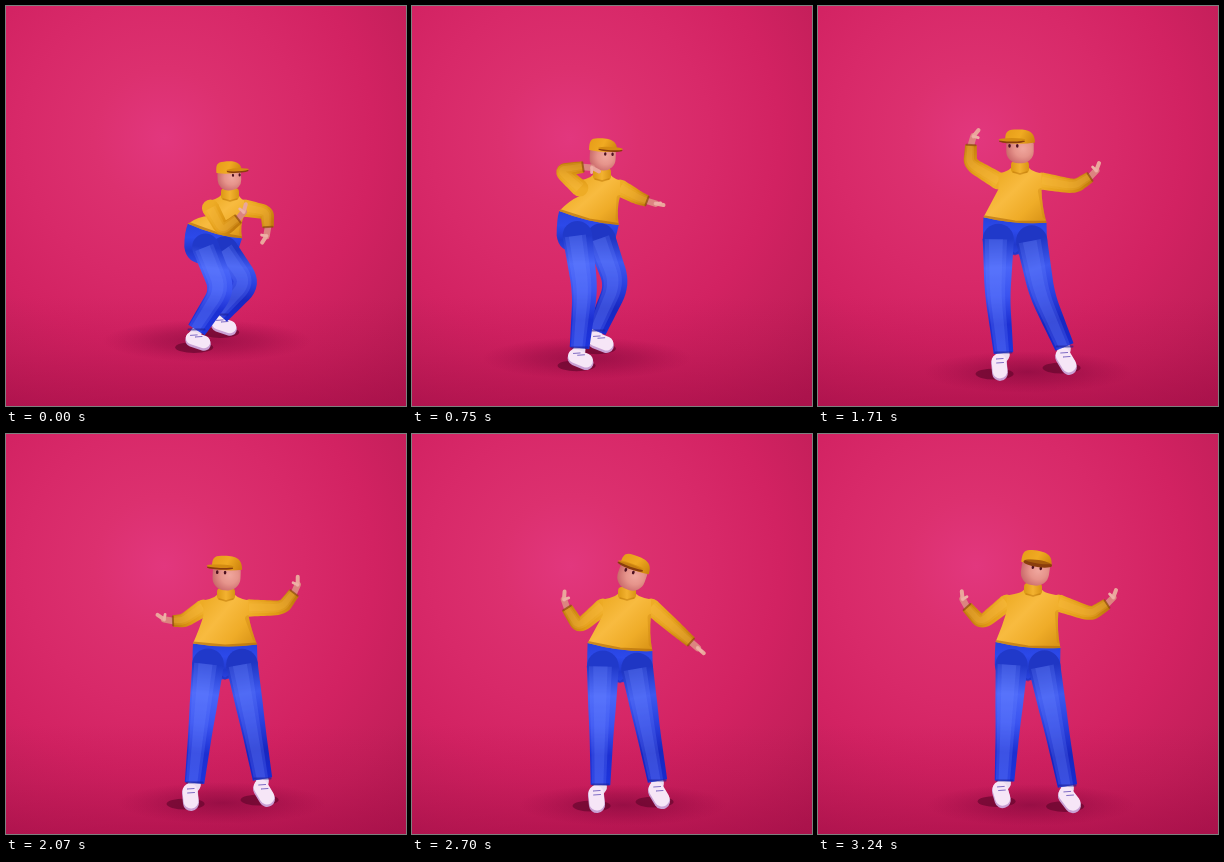
Animation of 400 by 400 pixels, one loop 3.27 s. Source, as an HTML page with a canvas:

```html
<!DOCTYPE html>
<html lang="en">
<head>
<meta charset="utf-8">
<title>Dancer</title>
<style>
html, body { margin: 0; width: 100%; height: 100%; overflow: hidden; background: #d2265f; }
canvas { display: block; width: 400px; height: 400px; }
</style>
</head>
<body>
<canvas id="stage" width="400" height="400"></canvas>
<script>
const ctx = document.getElementById('stage').getContext('2d');
const LOOP = 3270, STEP = 30, ARM = 54, LEG = 115;

// The dance: time, facing (-1 left to 1 right), head tilt, then the points
// neck, waist, left wrist, right wrist, left heel, right heel.
// Shoulders, elbows, hips, knees, hands and shoes all follow from these.
const poses = [
  [0, .9, -.05, 224, 185, 209, 225, 232, 213, 262, 221, 186, 332, 212, 317],
  [750, .7, .05, 190, 165, 177, 212, 171, 161, 235, 195, 163, 350, 183, 333],
  [1290, -.1, 0, 188, 161, 183, 215, 139, 169, 261, 170, 180, 352, 197, 343],
  [1710, -.72, 0, 202, 158, 197, 214, 153, 139, 272, 171, 181, 355, 245, 349],
  [2070, -.6, .04, 220, 157, 219, 210, 167, 187, 288, 159, 184, 357, 255, 353],
  [2700, -.4, .34, 215, 156, 208, 213, 155, 174, 279, 208, 184, 359, 244, 355],
  [3240, .12, .15, 215, 152, 210, 211, 149, 173, 289, 170, 182, 355, 248, 360]
];

const clamp = (v, lo = 0, hi = 1) => Math.max(lo, Math.min(hi, v));
const add = (p, x, y) => [p[0] + x, p[1] + y];
const mix = (a, b, u) => [a[0] + (b[0] - a[0]) * u, a[1] + (b[1] - a[1]) * u];

// Smooth interpolation with slopes taken from neighbouring poses.
function poseAt(t) {
  const last = poses.length - 1;
  let i = 0;
  while (i < last - 1 && t >= poses[i + 1][0]) i++;
  const from = poses[i], to = poses[i + 1], span = to[0] - from[0], u = (t - from[0]) / span;
  return from.map((v, k) => {
    const slope = j => {
      const a = poses[Math.max(0, j - 1)], b = poses[Math.min(last, j + 1)];
      return (b[k] - a[k]) / (b[0] - a[0]);
    };
    return v + (to[k] - v) * u * u * (3 - 2 * u)
      + span * .8 * u * (1 - u) * (slope(i) * (1 - u) - slope(i + 1) * u);
  });
}

// Middle joint of a two-bone limb; bend sets how far and to which side it leaves the line.
function joint(a, b, reach, along, bend) {
  const dx = b[0] - a[0], dy = b[1] - a[1], d = Math.hypot(dx, dy) || 1;
  const h = Math.sqrt(Math.max(0, reach * reach - d * d)) / 2 * bend(dx / d, dy / d);
  return add(mix(a, b, along), -dy / d * h, dx / d * h);
}

function buildRig(t) {
  const [, yaw, tilt, ...xy] = poseAt(t);
  const lift = t < 750 ? 13 * Math.sin(Math.PI * t / 750) : 0;
  const [neck, waist, wristL, wristR, heelL, heelR] = [0, 2, 4, 6, 8, 10].map(k =>
    [xy[k], xy[k + 1] - lift * clamp((320 - xy[k + 1]) / 150)]);
  const size = .82 + clamp((heelL[1] + heelR[1]) / 2 - 325, 0, 36) / 200;
  const side = Math.max(0, yaw), slope = (neck[0] - waist[0]) * .018;
  const half = 33 * size, hipHalf = half * (.53 - .2 * side);

  const arm = (sign, wrist) => {
    const shoulder = add(neck, sign * (27 * size - 6 * Math.abs(yaw)) - 3 * side, 17);
    const elbow = joint(shoulder, wrist, ARM * size, .68,
      (x, y) => clamp(3 * (x * .5 - y * sign), -1, 1));
    return [shoulder, elbow, wrist];
  };
  const leg = (sign, heel) => {
    const hip = add(waist, sign * hipHalf, 21 * size + sign * hipHalf * slope * .5);
    const ankle = add(heel, 3 - sign * 1.5, -8);
    const knee = joint(hip, ankle, LEG, .49, () => -.55 * clamp(2 * yaw + .7, -1, 1));
    const turn = clamp(yaw * 1.3), out = sign > 0 ? 6 : 1;
    const toe = add(heel, 12 * turn + out * (1 - turn), 10 - 6 * turn);
    return { bones: [hip, knee, ankle], heel, toe };
  };
  return {
    yaw, tilt, neck, waist, size, side,
    head: add(neck, 14.5 * size * Math.sin(tilt), -14.8 * size * Math.cos(tilt)),
    hem: [-1, 1].map(s => add(waist, s * half, s * half * slope)),
    armL: arm(-1, wristL), armR: arm(1, wristR),
    legL: leg(-1, heelL), legR: leg(1, heelR)
  };
}

function fill(color, alpha = 1) {
  ctx.globalAlpha = alpha;
  ctx.fillStyle = color;
  ctx.fill();
  ctx.globalAlpha = 1;
}
function oval(x, y, rx, ry, color, alpha) {
  ctx.beginPath();
  ctx.ellipse(x, y, rx, ry, 0, 0, 7);
  fill(color, alpha);
}
function shape(pts) {
  ctx.beginPath();
  pts.forEach(p => ctx.lineTo(...p));
  ctx.closePath();
}
function line(pts, width, color, alpha = 1) {
  ctx.globalAlpha = alpha;
  ctx.beginPath();
  pts.forEach(p => ctx.lineTo(...p));
  ctx.lineWidth = width;
  ctx.strokeStyle = color;
  ctx.stroke();
  ctx.globalAlpha = 1;
}
function paint(g, colors) {
  colors.forEach((c, i) => g.addColorStop(i / (colors.length - 1), c));
  return g;
}
const ramp = (a, b, ...colors) => paint(ctx.createLinearGradient(...a, ...b), colors);
const glow = (x, y, r, ...colors) => paint(ctx.createRadialGradient(x, y, 0, x, y, r), colors);

// Tapered tube along two bones with a rounded bend, lit from the upper left.
function limb([a, b, c], radii, base, light) {
  const p = mix(a, b, .72), q = mix(b, c, .28), spine = [];
  for (let i = 0; i <= 8; i++) spine.push(mix(a, p, i / 8));
  for (let i = 1; i < 8; i++) spine.push(mix(mix(p, b, i / 8), mix(b, q, i / 8), i / 8));
  for (let i = 0; i <= 8; i++) spine.push(mix(q, c, i / 8));
  const end = spine.length - 1;
  const edge = (scale, shift) => spine.map((s, i) => {
    const from = spine[Math.max(0, i - 1)], to = spine[Math.min(end, i + 1)];
    const dx = to[0] - from[0], dy = to[1] - from[1], d = Math.hypot(dx, dy) || 1;
    const u = i / end * 2, k = Math.min(1, Math.floor(u));
    const r = radii[k] + (radii[k + 1] - radii[k]) * (u - k);
    const lit = (dy * .85 - dx * .5) / d, o = r * (scale + shift * lit);
    return add(s, -dy / d * o, dx / d * o);
  });
  const tube = (scale, shift) => shape([...edge(scale, shift), ...edge(-scale, shift).reverse()]);
  oval(...a, radii[0], radii[0], base);
  tube(1, 0);
  fill(base);
  [.72, .45].forEach(s => { tube(s, .18); fill(light, .22); });
}

function backdrop() {
  ctx.fillStyle = glow(158, 132, 350, '#e2377e', '#dc306f', '#d82969', '#d22262', '#c41f5a', '#b21a51');
  ctx.fillRect(0, 0, 400, 400);
  ctx.fillStyle = ramp([0, 290], [0, 400], 'rgba(165,10,70,0)', 'rgba(165,10,70,.18)', 'rgba(160,8,68,.45)');
  ctx.fillRect(0, 290, 400, 110);
}

function shadow(l, r) {
  const [x, y] = mix(l, r, .5);
  ctx.save();
  ctx.translate(x - 5, y + 8);
  ctx.scale(1, .2);
  oval(0, 0, 105, 105, glow(0, 0, 105, 'rgba(120,5,55,.55)', 'rgba(135,8,60,.35)', 'rgba(150,8,65,0)'));
  ctx.restore();
  [l, r].forEach(p => oval(p[0] - 5, p[1] + 7, 19, 5.5, '#5c0428', .6));
}

function leg({ bones, heel, toe }, size, far) {
  const w = 16.5 * size;
  line([add(heel, 0, 2), add(toe, 0, 2)], w, '#c9a0d4');
  line([add(bones[2], 0, 2), heel], w * .8, '#eadcf0');
  line([heel, toe], w - 1, '#f6e6f7');
  [.1, .5].forEach(u => {
    const [x, y] = mix(heel, toe, u);
    line([[x - 3, y - 3], [x + 4, y - 3.5]], 1, '#7f6cc4');
  });
  const cloth = far
    ? ['#1f36c4', '#3d58ee', '#2a40de', '#1727c0', '#182ace']
    : ['#2039ca', '#4965f8', '#3a53f0', '#1c2fd2', '#1d34dc'];
  limb(bones, [16.3 * size, 12.6, 9.8], ramp(bones[0], bones[2], ...cloth), '#7088ff');
  const [x, y] = bones[2];
  line([[x - 8, y - .5], [x + 8, y - .5]], 2, '#1a1f96', .6);
}

function pelvis({ hem: [l, r], legL, legR, size, side }) {
  const hl = legL.bones[0], hr = legR.bones[0], w = 16 * size;
  const outL = add(hl, -w - 9 * side, 0), outR = add(hr, w, 2);
  const crotch = add(mix(hl, hr, .5), 0, 15 * size);
  ctx.beginPath();
  ctx.moveTo(...l);
  ctx.quadraticCurveTo(outL[0], l[1] + 8, ...outL);
  ctx.quadraticCurveTo(outL[0] + 2, outL[1] + 17, ...add(hl, 0, 17));
  ctx.lineTo(...crotch);
  ctx.lineTo(...add(hr, 4, 13));
  ctx.quadraticCurveTo(outR[0], outR[1] + 10, ...outR);
  ctx.lineTo(...r);
  fill(ramp([0, l[1]], [0, crotch[1] + 4], '#2743dd', '#2c49ea', '#2038cc', '#2f49ea'));
  line([add(crotch, -9, -6), crotch, add(crotch, 9, -6)], 2, '#1a2cb8', .5);
}

function arm([shoulder, elbow, wrist]) {
  // The hand curls on in the direction in which the elbow bends.
  const a = Math.atan2(elbow[1] - shoulder[1], elbow[0] - shoulder[0]);
  const b = Math.atan2(wrist[1] - elbow[1], wrist[0] - elbow[0]);
  const curl = clamp(2 * Math.sin(b - a), -1, 1) * .45;
  const toward = (p, angle, d) => add(p, Math.cos(angle) * d, Math.sin(angle) * d);
  const palm = toward(wrist, b + curl * .5, 9), tip = toward(palm, b + curl * 1.4, 8);
  line([wrist, palm], 6.5, '#dc8580');
  line([palm, tip], 4, '#eaa69c');
  line([palm, toward(palm, b + curl * 4, 5)], 2.8, '#eeb0a6');
  limb([shoulder, elbow, wrist], [8.6, 7, 5.8],
    ramp(shoulder, wrist, '#eeac26', '#e09a16', '#c27b0c'), '#fac048');
  const n = b + Math.PI / 2;
  line([toward(wrist, n, -4.5), toward(wrist, n, 4.5)], 2, '#8c4a0b', .7);
}

function sweater({ neck: [x, y], hem: [l, r], armL, armR }) {
  const sl = add(armL[0], 0, -7.5), sr = add(armR[0], 0, -7.5);
  const belly = add(mix(l, r, .5), 0, 5);
  ctx.beginPath();
  ctx.moveTo(x - 8, y + 2);
  ctx.quadraticCurveTo(x - 9, y + 7, ...sl);
  ctx.lineTo(...add(armL[0], 0, 8));
  ctx.quadraticCurveTo(...add(mix(sl, l, .65), 3, 0), ...l);
  ctx.quadraticCurveTo(...belly, ...r);
  ctx.quadraticCurveTo(...add(mix(sr, r, .65), -3, 0), ...add(armR[0], 0, 8));
  ctx.lineTo(...sr);
  ctx.quadraticCurveTo(x + 9, y + 7, x + 8, y + 2);
  fill(ramp(sl, r, '#eeac26', '#f8bb40', '#efac28', '#d69014'));
  ctx.save();
  ctx.clip();
  line([l, mix(mix(l, r, .5), belly, .5), r], 4, '#b06a0a', .6);
  line([add(sr, 0, 18), mix(sr, r, .85)], 7, '#c47c0c', .3);
  ctx.restore();
  ctx.beginPath();
  ctx.roundRect(x - 9, y - 3, 18, 12, 4);
  fill(ramp([x - 9, y], [x + 9, y], '#dc9814', '#f3b230', '#d89314'));
  line([[x - 7, y + 8], [x, y + 10], [x + 7, y + 8]], 1.4, '#c27c0c', .6);
}

function face({ head, yaw, tilt, size }) {
  ctx.save();
  ctx.translate(...head);
  ctx.rotate(tilt);
  ctx.scale(15 * size, 15 * size);
  ctx.beginPath();
  ctx.roundRect(-.96, -.9, 1.92, 1.84, [.5, .5, .85, .85]);
  fill(glow(.2, -.1, 1.2, '#f0a79e', '#e6948b', '#c9696a'));
  [-.27, .27].forEach(d => oval(yaw * .64 + d, -.28, .09, .13, '#4c1020'));
  // The brim swings with the face and shows its dark underside from the front.
  const front = clamp(1 - Math.abs(yaw) * 2), brim = yaw * .78;
  ctx.beginPath();
  ctx.moveTo(-1.03, -.52);
  ctx.bezierCurveTo(-1.05, -1.2, -.95, -1.4, -.4, -1.42);
  ctx.bezierCurveTo(.5, -1.46, 1.03, -1.35, 1.05, -.52);
  ctx.quadraticCurveTo(0, -.34, -1.03, -.52);
  fill(ramp([-1, -1.4], [1, -.5], '#e69d18', '#f0aa22', '#cb820c'));
  oval(brim, -.6 + front * .04, .9 + front * .1, .14 + front * .13, '#8a3d0d');
  oval(brim, -.7, .92, .12, '#d48c12', 1 - front * .8);
  ctx.restore();
}

function draw(time) {
  const rig = buildRig(Math.floor(time % LOOP / STEP) * STEP);
  const { legL, legR, armL, armR, size } = rig;
  backdrop();
  shadow(mix(legL.heel, legL.toe, .6), mix(legR.heel, legR.toe, .6));
  pelvis(rig);
  leg(legR, size, true);
  leg(legL, size, false);
  arm(armR);
  if (rig.yaw < .3) arm(armL);
  sweater(rig);
  face(rig);
  if (rig.yaw >= .3) arm(armL);
}

ctx.lineCap = ctx.lineJoin = 'round';
const start = performance.now();
function tick() {
  draw(performance.now() - start);
  requestAnimationFrame(tick);
}
tick();
</script>
</body>
</html>
```
